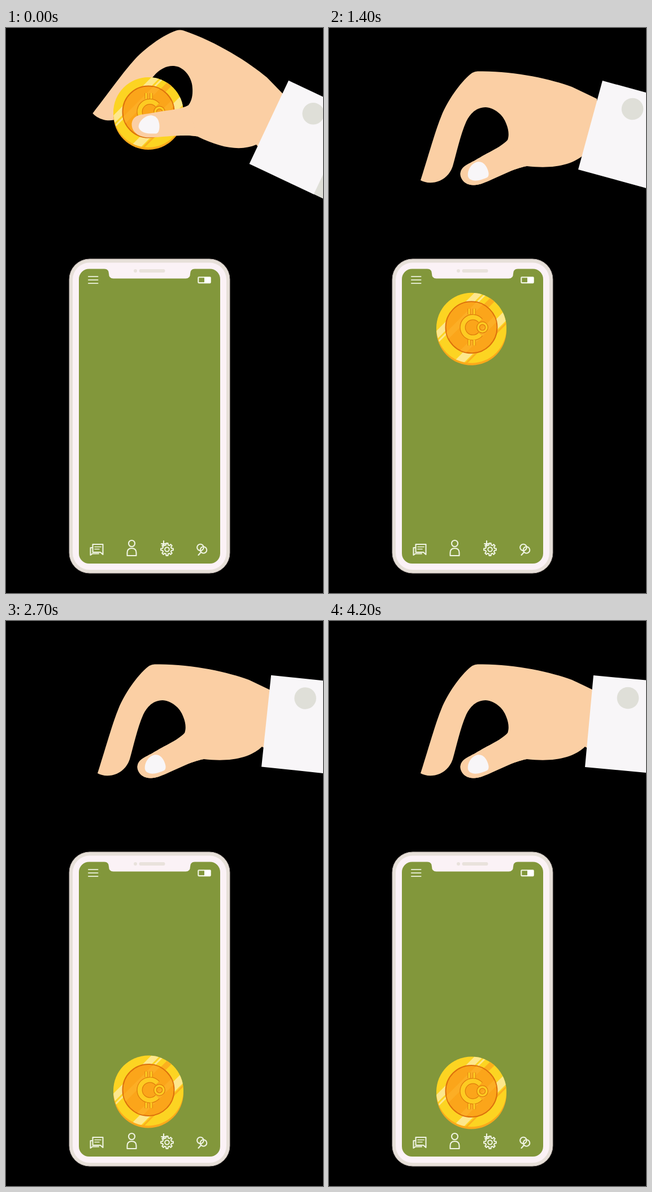
Recreate the animation shown at these times as an HTML page. Size 561 px wide and 998 px high, loop 9100 ms.

```html
<!DOCTYPE html>
<html lang="en">
<head>
<meta charset="utf-8">
<title>Coin into phone</title>
<style>
  html, body { margin: 0; width: 100%; height: 100%; overflow: hidden; background: #000; }
  svg { display: block; width: 100%; height: 100%; }
  .skin { fill: #fbcfa4; }
  .cuff { fill: #f8f6f8; }
  .line { fill: none; stroke: #eff3e2; stroke-width: 2.1; stroke-linecap: round; stroke-linejoin: round; }
  .dark { fill: none; stroke: #df7d0c; }
  .gold { fill: none; stroke: #fdcb22; }
</style>
</head>
<body>
<svg viewBox="0 0 561 998" preserveAspectRatio="none">
  <defs>
    <clipPath id="face"><circle r="62"/></clipPath>
    <clipPath id="disc"><circle cy="-1" r="45"/></clipPath>
    <path id="glyph" d="M16 -13A18 18 0 1 0 16 11"/>
    <path id="bars" d="M-4 -34V-24M5 -34V-24M-4 21V31M5 21V31"/>
  </defs>
  <rect width="561" height="998"/>

  <!-- phone body and screen -->
  <rect x="112" y="408" width="284" height="555" rx="36" fill="#e7e0d9" stroke="#b8aea9"/>
  <rect x="125" y="421" width="258" height="529" rx="20" fill="#82973b"/>

  <!-- open hand, behind the coin -->
  <g class="hand">
    <path class="skin" d="M162 269C178 219 188 182 199 155C209 130 232 96 251 81Q256 77 263 76.500C325 75 393 90 430 104L474 125L485 200L462 227L453 222
      C431 243 395 249 350 244C325 248 295 266 270 275C255 280 238 278 233 262C231 252 236 246 245 241C255 236 270 227 279 222
      C295 214 310 205 316 198C319 190 318 180 314 170C308 152 292 141 277 140C262 140 250 150 243 165C232 190 226 220 219 244
      C213 262 198 272 183 273Q171 274 162 269Z"/>
  </g>

  <g id="coin">
    <circle cy="4" r="62" fill="#fba91b"/>
    <circle r="62" fill="#fcd422"/>
    <g clip-path="url(#face)">
      <g transform="rotate(-45)">
        <path fill="#fde78c" d="M-70 -40H70V-29H-70ZM-70 -26H70V-23H-70ZM-70 20H70V34H-70Z"/>
        <path fill="#fbb01d" d="M0 -14H70V-4H0ZM-70 36H70V39H-70Z"/>
      </g>
    </g>
    <circle cy="-1" r="45.500" fill="#fba51a" stroke="#dc700c" stroke-width="2"/>
    <g clip-path="url(#disc)">
      <path transform="rotate(-45)" fill="#fdb62e" opacity=".55" d="M-60 -26H60V-15H-60ZM-60 14H60V24H-60Z"/>
    </g>
    <use href="#bars" class="dark" stroke-width="5.500"/>
    <use href="#glyph" class="dark" stroke-width="10.500"/>
    <use href="#bars" class="gold" stroke-width="3.500"/>
    <use href="#glyph" class="gold" stroke-width="8"/>
    <circle class="dark" cx="19.500" cy="-1" r="7.500" stroke-width="6"/>
    <circle class="gold" cx="19.500" cy="-1" r="7.500" stroke-width="3.500"/>
  </g>

  <!-- thumb, in front of the coin -->
  <g class="hand">
    <path class="skin" d="M350 244C325 248 295 266 270 275C255 280 238 278 233 262C231 252 236 246 245 241C255 236 270 227 279 222C295 214 310 205 316 198Z"/>
    <path class="cuff" d="M246 262C244 252 252 239 262 236.500C270 235 275 239 279 246C283 254 284 261 280 264C270 268 262 271 254 269Q247 267 246 262Z"/>
  </g>
  <g id="sleeve">
    <path fill="#dfdfd8" d="M590 107L693 117L678 279L575 269Z"/>
    <path class="cuff" d="M468 96L593.500 107.600L578.500 269.600L453 258Z"/>
    <circle cx="529" cy="136" r="19.300" fill="#dfdfd8"/>
  </g>

  <!-- bezel hides the coin as it slips in -->
  <path fill="#fbf2f6" fill-rule="evenodd" d="M148 414.500H360A30 30 0 0 1 390 444.500V927A30 30 0 0 1 360 957H148A30 30 0 0 1 118 927V444.500A30 30 0 0 1 148 414.500Z
    M147 425.500H174Q182 425.500 182 434Q182 442.500 190 442.500H318Q326 442.500 326 434Q326 425.500 334 425.500H361A18 18 0 0 1 379 443.500V928A18 18 0 0 1 361 946H147A18 18 0 0 1 129 928V443.500A18 18 0 0 1 147 425.500Z"/>
  <circle cx="229" cy="429" r="3" fill="#e9e2dc"/>
  <rect x="235.500" y="426" width="46" height="6" rx="3" fill="#e9e2dc"/>

  <!-- status icons -->
  <path class="line" opacity=".85" stroke-width="1.800" d="M146 439H162.500M146 445H162.500M146 451H162.500"/>
  <rect class="line" x="340.300" y="440.300" width="21.500" height="9.800" rx="1"/>
  <path fill="#fff" d="M351 440H362V450.500H351Z"/>

  <!-- tab icons -->
  <g class="line">
    <path d="M153.500 912H171.500V930L167 926H153.500ZM153 918H149.500V931L153 928.500H164" />
    <path stroke-width="1.600" d="M157 916.500H168M157 920.500H165"/>
    <circle cx="222.500" cy="910.500" r="5.500"/>
    <path d="M214.500 932V927Q214.500 919 222.500 919Q230.500 919 230.500 927V932Z"/>
    <path id="gear"/>
    <circle cx="285" cy="921" r="3.800"/>
    <path d="M279 906V915M275 911H283"/>
    <circle cx="344" cy="917.500" r="5.800"/>
    <circle cx="349.500" cy="922" r="5.800"/>
    <path d="M345.500 925.500L340.500 931"/>
  </g>
</svg>
<script>
const LOOP = 9100, STEP = 100, TURN = 20, PIVOT = '493 185.5';
const coin = document.getElementById('coin');
const sleeve = document.getElementById('sleeve');
const hands = document.querySelectorAll('.hand');

// coin travel: [time, drop]
const drops = [[0, 0], [2600, 683], [3000, 666.5], [4200, 682.5]];
const smooth = x => x * x * (3 - 2 * x);

function dropAt(t) {
  for (let i = 1; i < drops.length; i++) {
    const [t0, y0] = drops[i - 1], [t1, y1] = drops[i];
    if (t <= t1) return y0 + (y1 - y0) * smooth((t - t0) / (t1 - t0));
  }
  return drops[drops.length - 1][1];
}

const turn = (t, duration) => `rotate(${TURN * Math.max(0, 1 - t / duration)} ${PIVOT})`;

function gearPath(cx, cy, teeth, inner, outer) {
  const points = [];
  for (let i = 0; i < teeth; i++) {
    [[-.32, inner], [-.18, outer], [.18, outer], [.32, inner]].forEach(([offset, r]) => {
      const a = (i + offset) / teeth * 2 * Math.PI - Math.PI / 2;
      points.push(`${(cx + r * Math.cos(a)).toFixed(2)} ${(cy + r * Math.sin(a)).toFixed(2)}`);
    });
  }
  return `M${points.join('L')}Z`;
}
document.getElementById('gear').setAttribute('d', gearPath(285, 921, 8, 8, 11));

const start = performance.now();
function draw(now) {
  const t = Math.floor(Math.max(0, now - start) % LOOP / STEP) * STEP;
  coin.setAttribute('transform', `translate(252 ${149 + dropAt(t)})`);
  hands.forEach(hand => hand.setAttribute('transform', turn(t, 1200)));
  sleeve.setAttribute('transform', turn(t, 2800));
  requestAnimationFrame(draw);
}
draw(start);
</script>
</body>
</html>
```
